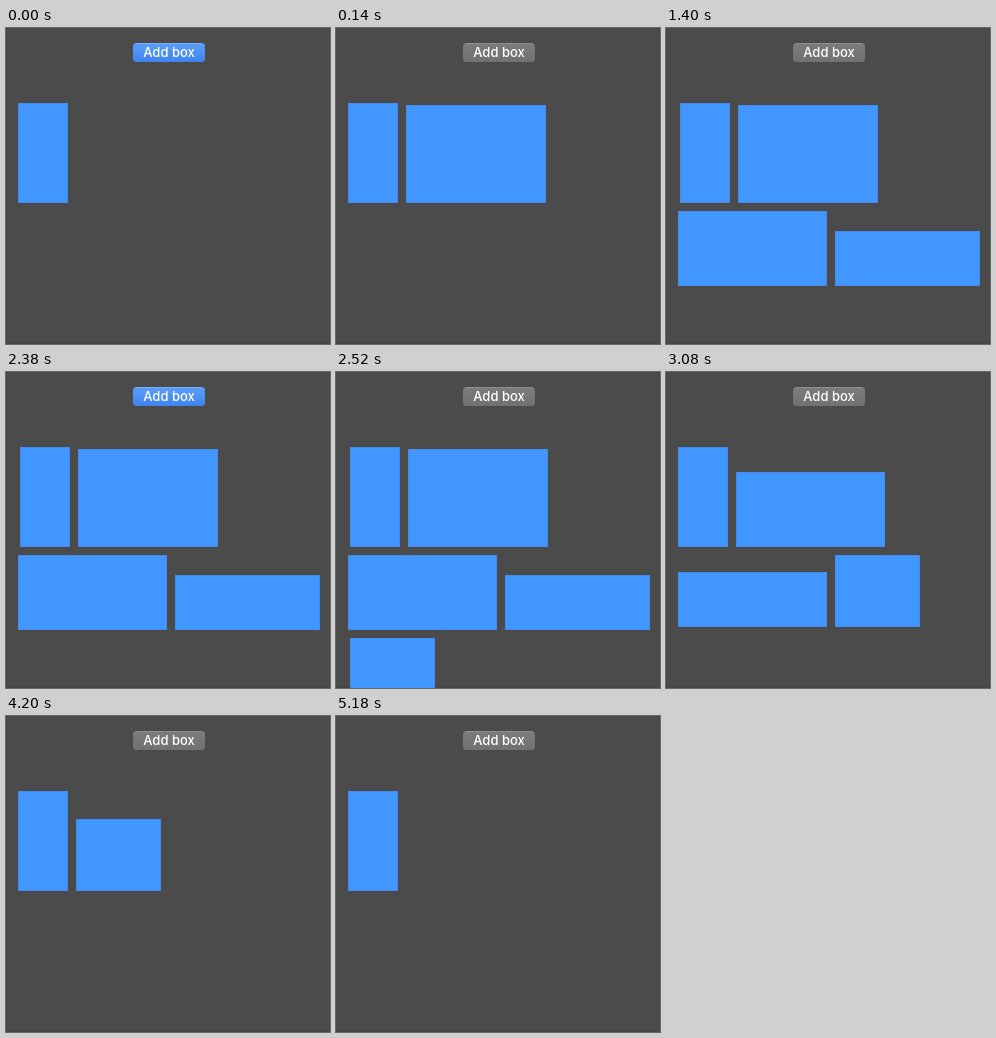
These frames come from a looping animation (324x316 px, 5250 ms). An HTML page with a canvas:

```html
<!DOCTYPE html>
<html lang="en">
<head>
<meta charset="utf-8">
<title>Add box</title>
<style>
  html, body { margin: 0; width: 100%; height: 100%; overflow: hidden; background: #4b4b4c; }
  canvas { display: block; }
</style>
</head>
<body>
<canvas id="stage" width="324" height="316"></canvas>
<script>
const ctx = document.getElementById('stage').getContext('2d');
const LOOP = 5250;

// Boxes as [x, bottom, width, height]; every row is aligned to its bottom edge.
const tall = [12, 175, 50, 100];
const two = [tall, [70, 175, 140, 98]];
const three = [...two, [12, 258, 149, 75]];
const four = [[14, 175, 50, 100], [72, 175, 140, 98], three[2], [169, 258, 145, 55]];
const five = [...four, [14, 338, 85, 72]];

// [start time, button pressed, boxes]
const states = [
  [0, true, [tall]],
  [70, false, two],
  [700, true, two],
  [840, false, three],
  [1050, true, three],
  [1260, false, four],
  [2380, true, four],
  [2520, false, five],
  [3080, false, [tall, [70, 175, 149, 75], [12, 255, 149, 55], [169, 255, 85, 72]]],
  [3710, false, [tall, [70, 175, 149, 55], [227, 175, 85, 72]]],
  [4200, false, [tall, [70, 175, 85, 72]]],
  [5180, false, [tall]],
];

function drawBox([x, bottom, w, h]) {
  const y = bottom - h;
  ctx.fillStyle = '#4296ff';
  ctx.fillRect(x, y, w, h);
  ctx.strokeStyle = '#418ced';
  ctx.strokeRect(x + 0.5, y + 0.5, w - 1, h - 1);
}

function drawButton(pressed) {
  const fill = ctx.createLinearGradient(0, 15, 0, 34);
  fill.addColorStop(0, pressed ? '#5c9ffa' : '#7c7c7d');
  fill.addColorStop(1, pressed ? '#3f84ee' : '#717172');
  ctx.fillStyle = fill;
  ctx.beginPath();
  ctx.roundRect(127, 15, 72, 19, 3.5);
  ctx.fill();
  ctx.fillStyle = pressed ? '#79b0fb' : '#8e8e8f';
  ctx.fillRect(130, 15, 66, 1);

  ctx.fillStyle = '#fff';
  ctx.font = '500 13px Inter, sans-serif';
  ctx.textAlign = 'center';
  ctx.fillText('Add box', 163, 29);
}

function draw(now) {
  const time = now % LOOP;
  const [, pressed, boxes] = states.findLast(([start]) => start <= time);
  ctx.fillStyle = '#4b4b4c';
  ctx.fillRect(0, 0, 324, 316);
  ctx.fillStyle = '#434344';
  ctx.fillRect(0, 315, 324, 1);
  boxes.forEach(drawBox);
  drawButton(pressed);
}

function loop() {
  draw(performance.now());
  requestAnimationFrame(loop);
}
loop();
</script>
</body>
</html>
```
